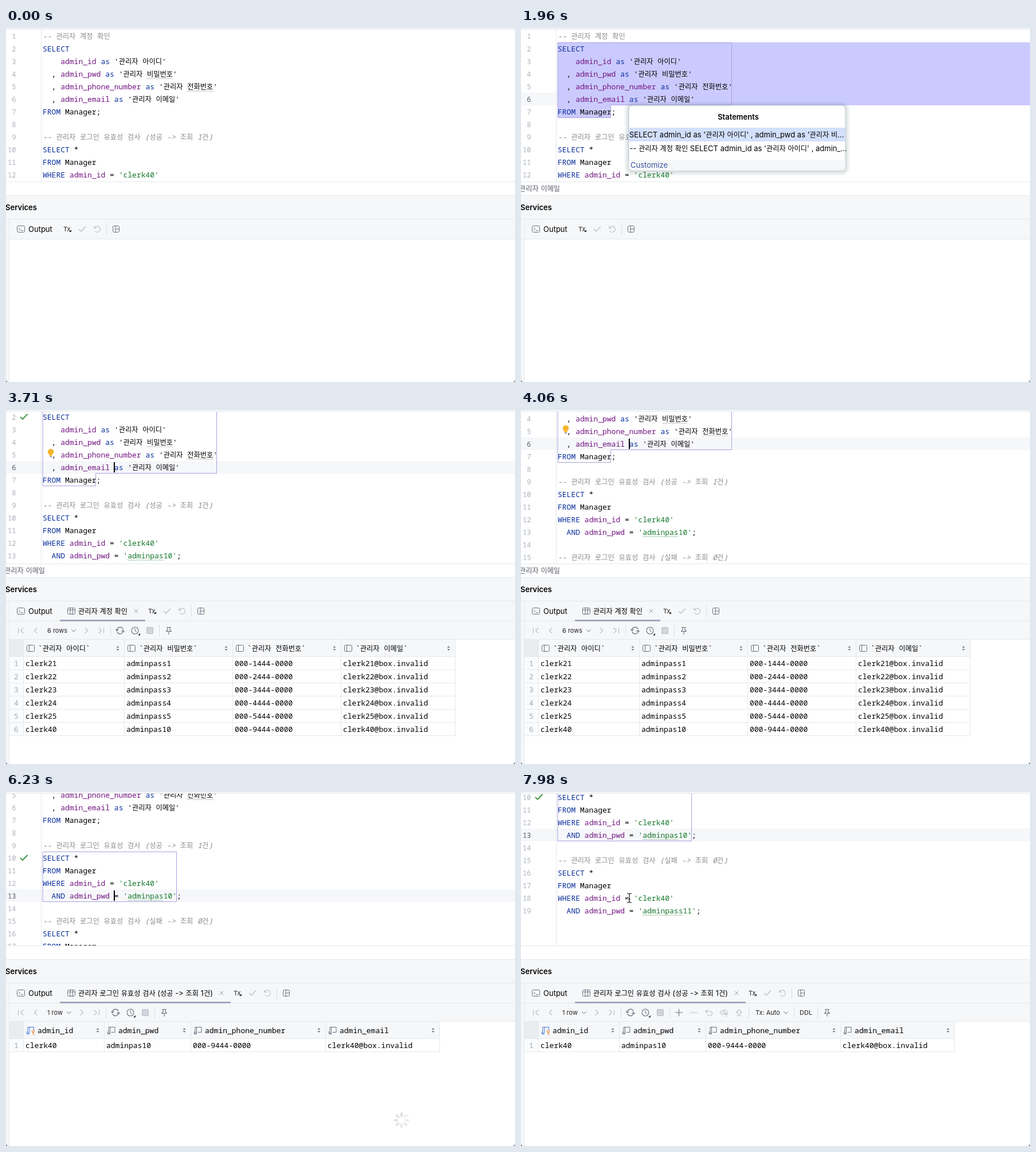
An HTML page that plays this animation: 888 by 618 pixels, repeating every 8 s.

```html
<!DOCTYPE html>
<html lang="ko">
<head>
<meta charset="utf-8">
<title>SQL console</title>
<style>
html, body { margin: 0; width: 100%; height: 100%; overflow: hidden; background: #fff; }
svg { display: block; width: 888px; height: 618px; }
text { white-space: pre; font: 13px Inter, sans-serif; }
.m { font: 13px "Noto Sans Mono", monospace; }
.n { font-size: 12px; text-anchor: end; fill: #adb1bd; }
.g { text-anchor: middle; fill: #a3a7b3; }
.u { font-size: 11px; fill: #222; }
.b { font-weight: 600; }
.k { font-family: "Noto Sans CJK KR", "Noto Sans CJK", sans-serif; font-size: 12.22px; font-style: normal; }
.w { fill: #0a2f9c; }
.f { fill: #731582; }
.s { fill: #14782b; }
.c { fill: #8c8c8c; font-style: italic; }
path { fill: none; stroke-linecap: round; stroke-linejoin: round; }
</style>
</head>
<body>
<svg id="stage" viewBox="0 0 888 618"></svg>
<script>
const LOOP = 8000, STEP = 70, ROW = 22;
const BG = '#f6f7f9', LINE = '#e6e8ec', INK = '#6c707e', DIM = '#b9bcc6';
const stage = document.getElementById('stage');

const code = `-- 관리자 계정 확인
SELECT
    admin_id as '관리자 아이디'
  , admin_pwd as '관리자 비밀번호'
  , admin_phone_number as '관리자 전화번호'
  , admin_email as '관리자 이메일'
FROM Manager;

-- 관리자 로그인 유효성 검사 (성공 -> 조회 1건)
SELECT *
FROM Manager
WHERE admin_id = 'clerk40'
  AND admin_pwd = 'adminpas10';

-- 관리자 로그인 유효성 검사 (실패 -> 조회 0건)
SELECT *
FROM Manager
WHERE admin_id = 'clerk40'
  AND admin_pwd = 'adminpass11';`.split('\n');
const typos = [[4, 246, 291], [5, 316, 362], [13, 212, 275], [19, 212, 283]];

const user = i => 'clerk' + (i < 6 ? 20 + i : 40);
const record = i => [user(i), i < 6 ? 'adminpass' + i : 'adminpas10',
  `000-${i < 6 ? i : 9}444-0000`, user(i) + '@box.invalid'];

const grids = [
  null,
  { title: '관리자 계정 확인', dx: 148, count: '6 rows', sx: 0, cols: [30, 206, 395, 584, 783], pad: 26,
    heads: ['아이디', '비밀번호', '전화번호', '이메일'].map(s => '`관리자 ' + s + '`'),
    rows: [1, 2, 3, 4, 5, 6].map(record) },
  { title: '관리자 로그인 유효성 검사 (성공 -> 조회 1건)', dx: 297, count: '1 row', sx: -8, cols: [30, 171, 322, 557, 756], pad: 25,
    heads: ['admin_id', 'admin_pwd', 'admin_phone_number', 'admin_email'],
    rows: [record(6)] }
];
const menus = [
  null,
  ["SELECT admin_id as '관리자 아이디' , admin_pwd as '관리자 비...",
   "-- 관리자 계정 확인 SELECT admin_id as '관리자 아이디' , admin_..."],
  ["SELECT * FROM Manager WHERE admin_id = 'clerk40' AND a...",
   '-- 관리자 로그인 유효성 검사 (성공 -> 조회 1건) SELECT * FRO...']
];

const runs = s => s.replace(/[가-힣]+/g, m => `<tspan class="k">${m}</tspan>`);
const text = (x, y, s, cls = '', fill = '') =>
  `<text x="${x}" y="${y}" class="${cls}"${fill && ` fill="${fill}"`}>${runs(s)}</text>`;
const rect = (x, y, w, h, fill, more = '') =>
  `<rect x="${x}" y="${y}" width="${w}" height="${h}" fill="${fill}" ${more}/>`;
const path = (d, color = INK, w = 1, more = '') =>
  `<path d="${d}" stroke="${color}" stroke-width="${w}" ${more}/>`;
const at = (x, y, s) => `<g transform="translate(${x} ${y})">${s}</g>`;
const hline = (y, x = 0, x2 = 888) => rect(x, y, x2 - x, 1, LINE);
const sep = (x, y) => rect(x, y - 10, 1, 20, '#dcdee4');
const clamp = v => Math.max(0, Math.min(1, v));
const rowTop = n => 3 + ROW * (n - 1);

const highlight = s => s.startsWith('--') ? `<tspan class="c">${s}</tspan>`
  : s.replace(/'[^']*'|\badmin_\w+|\b(SELECT|FROM|WHERE|AND|as)\b/g, m => {
      const cls = m[0] === "'" ? (/[가-힣]/.test(m) ? '' : 's') : m.startsWith('admin_') ? 'f' : 'w';
      return `<tspan class="${cls}">${m}</tspan>`;
    });

function wave(x, x2, y, color) {
  let d = `M${x} ${y}`;
  for (let i = 1; x + i * 2 <= x2; i++) d += `L${x + i * 2} ${y + (i % 2 ? 2 : 0)}`;
  return path(d, color, 0.9);
}

// Icons are centred on 0,0
const icon = {
  output: rect(-6.5, -5.5, 13, 11, 'none', `rx="2" stroke="${INK}"`) + path('M-3.5 -2L-1.5 0L-3.5 2M0 2.5H3.5'),
  table: rect(-6.5, -5.5, 13, 11, 'none', `rx="2" stroke="${INK}"`) + path('M-6 -2H6M-2 -5V5M2.5 -5V5'),
  layout: rect(-5.5, -5.5, 11, 11, 'none', `rx="2" stroke="${INK}"`) + path('M-1 -5V5M-1 0H5'),
  check: path('M-5.5 .5L-2 4L5.5 -4', DIM, 1.2),
  undo: path('M-5 -5V-1.5H-1.5M-4.5 -2A5.2 5.2 0 1 1 -4 3.5', DIM, 1.1),
  close: path('M-3 -3L3 3M3 -3L-3 3', '#9a9eaa'),
  first: path('M-4.5 -4.5V4.5M4 -4.5L-.5 0L4 4.5', DIM, 1.1),
  prev: path('M2 -4.5L-2.5 0L2 4.5', DIM, 1.1),
  next: path('M-2 -4.5L2.5 0L-2 4.5', DIM, 1.1),
  last: path('M4.5 -4.5V4.5M-4 -4.5L.5 0L-4 4.5', DIM, 1.1),
  down: path('M-3.5 -1.5L0 2L3.5 -1.5', INK),
  refresh: path('M-5.5 0A5.5 5.5 0 0 1 5 -2.5M5.5 0A5.5 5.5 0 0 1 -5 2.5M-7.5 -2L-5.5 .5L-3 -1.5M7.5 2L5.5 -.5L3 1.5', INK, 1.2),
  clock: `<circle r="6" fill="none" stroke="${INK}" stroke-width="1.1"/>` + path('M0 -3.5V.5L2.5 2') +
    '<path d="M9 4.5V8.5H5Z" style="fill:#333"/>',
  stop: rect(-5.5, -5.5, 11, 11, '#d3d5db', 'rx="1.5" stroke="#b9bcc6"'),
  pin: path('M-3.5 -5.5H3.5M-2 -5V-1L-4.5 1.5H4.5L2 -1V-5M0 2V6.5', INK, 1.1),
  plus: path('M-6 0H6M0 -6V6', INK, 1.1),
  minus: path('M-6 0H6', DIM, 1.1),
  back: path('M-3 -5L-6 -2L-3 1M-5.5 -2H2A3.5 3.5 0 0 1 2 5H-3', DIM, 1.1),
  eye: path('M-7 0Q0 -9 7 0M-7 0Q-4 4 -1 4', DIM, 1.1) + `<circle r="2" fill="none" stroke="${DIM}"/>` + path('M4 7V1M1.5 3.5L4 1L6.5 3.5', DIM, 1.1),
  up: path('M-5 0L0 -5L5 0H2V5.5H-2V0Z', DIM, 1.1),
  sort: '<path d="M-2.5 -1.2L0 -4L2.5 -1.2ZM-2.5 1.2L0 4L2.5 1.2Z" style="fill:#6c707e"/>',
  column: rect(-6.5, -5.5, 13, 11, 'none', `rx="2" stroke="${INK}"`) + path('M-2.5 -5V5'),
  field: path('M-2.5 5H-5V-5.5H6V3.5H0M-2.5 -5V5') + path('M-6.5 2.5V6.5H-2.5'),
  key: path('M-2.5 5H-5V-5.5H5.5V-1M-2 -5V4', '#4677d4') + path('M-6.5 2.5V6.5H-2.5', '#4677d4') +
    '<circle cx="4.5" cy="2" r="2" fill="none" stroke="#e08a3c" stroke-width="1.2"/>' + path('M4.5 4V7.5H6', '#e08a3c', 1.2),
  bulb: '<circle r="5.3" cy="-2" fill="#f5b62e"/>' + rect(-2.5, 3, 5, 2, '#f5b62e') + rect(-2, 5.6, 4, 1.6, '#8a8d98'),
  tick: path('M-5.5 .5L-2 4L6 -4.5', '#459b4c', 2)
};
const put = (name, x, y) => at(x, y, icon[name]);

function outline(block) {
  return block === 1 ? 'M64.5 25.5H367.5V134.5H156.5V156.5H64.5Z' : 'M64.5 201.5H297.5V288.5H64.5Z';
}

function editor(s) {
  let o = '';
  if (s.row) o += rect(0, rowTop(s.row), 888, ROW, '#f6f7fa');
  if (s.menu === 1) o += rect(64, 25, 824, 110, '#cbcafe') + rect(64, 135, 93, 22, '#cbcafe');
  if (s.menu === 2) o += rect(64, 201, 824, 66, '#cbcafe') + rect(64, 267, 234, 22, '#cbcafe');
  o += rect(61, 0, 1, 700, LINE);
  if (s.block) o += path(outline(s.block), '#a9a2df');
  code.forEach((line, i) => {
    const y = rowTop(i + 1) + 16;
    o += text(17.5, y - 0.5, '' + (i + 1), 'm n', '').replace('<text', i + 1 === s.row ? '<text style="fill:#555a68"' : '<text');
    o += `<text x="64" y="${y}" class="m">${runs(highlight(line))}</text>`;
  });
  if (!s.menu) for (const [n, a, b] of typos) o += wave(a, b, rowTop(n) + 18, n > 9 ? '#9cc5a0' : '#b4bcae');
  if (s.tick) o += put('tick', 31, rowTop(s.tick) + 11);
  if (s.bulb) o += put('bulb', 78, rowTop(5) + 8);
  if (s.caret) o += rect(188, rowTop(s.row) + 2, 2, 18, '#000');
  return `<clipPath id="pane"><rect y="3" width="888" height="265"/></clipPath>
    <g clip-path="url(#pane)">${at(0, -s.scroll, o)}</g>`;
}

function chrome(s) {
  const g = grids[s.grid], dx = g ? g.dx : 0;
  let o = rect(0, 0, 888, 2, BG) + hline(2) + hline(268);
  if (s.crumb) o += text(-3, 285, '관리자 이메일', '', '#5a5d68');
  o += rect(0, 292, 888, 77, BG) + hline(292) + hline(333) + hline(368);
  o += rect(0, 369, 5, 249, BG) + rect(5, 334, 1, 284, LINE);
  o += text(-1, 318, 'Services', 'b') + put('output', 26, 351) + text(39, 356, 'Output');
  if (g) {
    o += put('table', 114, 351) + text(126, 356, g.title) + put('close', 79 + dx, 351);
    o += rect(94, 366, dx + 1, 3, '#a3a6c0', 'rx="1"');
  }
  o += at(dx, 0, text(100, 355, 'Tx', 'u') + '<path d="M114 352V356H110Z" style="fill:#333"/>' +
    put('check', 133, 351) + put('undo', 159, 351) + sep(175, 351) + put('layout', 192, 351));
  return o + (g ? results(g, s.full) : '');
}

function results(g, full) {
  const Y = 385, right = g.cols[4], bottom = 430 + 23 * g.rows.length;
  let o = rect(6, 369, 882, 32, BG) + put('first', 26, Y) + put('prev', 52, Y) + text(72, 389, g.count, 'u');
  o += at(g.sx, 0, put('down', 118, Y) + put('next', 140, Y) + put('last', 166, Y) + sep(182, Y) +
    put('refresh', 199, Y) + put('clock', 225, Y) + put('stop', 251, Y) + sep(267, Y));
  if (full) {
    ['plus', 'minus', 'back', 'eye', 'up'].forEach((n, i) => o += put(n, 275.5 + i * 26.2, Y));
    o += sep(397, Y) + text(409, 389, 'Tx: Auto', 'u') + put('down', 462, Y) + sep(476, Y) +
      text(486, 389, 'DDL', 'u') + sep(517, Y) + put('pin', 534, Y);
  } else o += put('pin', 284 + g.sx, Y);
  o += rect(6, 401, right - 6, 29, BG) + rect(6, 401, 24, 29, '#ebecf0') + rect(6, 430, 24, bottom - 430, '#fafbfc');
  o += hline(400, 6);
  for (let y = 430; y <= bottom; y += 23) o += hline(y, 6, right + 1);
  g.cols.forEach(x => o += rect(x, 401, 1, bottom - 401, LINE));
  g.heads.forEach((h, i) => {
    const x = g.cols[i];
    o += put(g.sx ? (i ? 'field' : 'key') : 'column', x + 13, 416) + text(x + g.pad, 421, h, 'm');
    o += put('sort', g.cols[i + 1] - 11, 416);
  });
  g.rows.forEach((r, j) => {
    const y = 447 + 23 * j;
    o += text(18, y, '' + (j + 1), 'm g');
    r.forEach((v, i) => o += text(g.cols[i] + 4, y, v, 'm'));
  });
  return o;
}

function popup(s) {
  const [a, b] = menus[s.menu];
  let shadow = '';
  for (let i = 8; i > 0; i--) shadow += rect(-i, -i + 1, 378 + 2 * i, 114 + 2 * i, '#203040', `rx="${7 + i}" opacity=".018"`);
  return `<g opacity="${s.fade}">` + at(188, s.menu === 1 ? 135 : 192, shadow +
    rect(0, 0, 378, 114, '#fff', 'rx="7" stroke="#b9bcc6" stroke-width=".8"') +
    '<text x="191" y="25" class="b" text-anchor="middle">Statements</text>' +
    rect(0, 39, 378, 24, '#d3e0fc') + text(1, 56, a) + text(1.5, 80, b) +
    '<path d="M0 95H378V107A7 7 0 0 1 371 114H7A7 7 0 0 1 0 107Z" style="fill:#f6f7f9"/>' +
    text(3, 109, 'Customize', '', '#3b559c')) + '</g>';
}

function spinner(t) {
  let o = '';
  for (let i = 0; i < 8; i++) {
    const v = ((i - Math.round(t / STEP)) % 8 + 8) % 8;
    o += path('M0 -7.5V-12', '#8b8f98', 3.6, `opacity="${0.16 + v * 0.022}" transform="rotate(${i * 45})"`);
  }
  return at(690, 573, o);
}

function pointer([x, y]) {
  if (y > 268) return at(x, y, '<path d="M0 0V15L3.5 11.7L6 17L8.4 16L6 10.8H10.8Z" style="fill:#000" stroke="#fff"/>');
  const d = 'M-3.5 -8Q0 -8 0 -5.5Q0 -8 3.5 -8M0 -6V6M-3.5 8Q0 8 0 5.5Q0 8 3.5 8M-1.5 2H1.5';
  return at(x, y, path(d, '#fff', 3) + path(d, '#111', 1.2));
}

// Point on a polyline, p from 0 to 1
function along(pts, p) {
  const u = clamp(p) * (pts.length - 1), i = Math.min(pts.length - 2, Math.floor(u));
  return pts[i].map((v, k) => v + (pts[i + 1][k] - v) * (u - i));
}

function mouse(t) {
  if (t >= 350 && t < 1750) return along([[371, 472], [300, 250], [215, 68], [189, 124]], (t - 350) / 630);
  if (t >= 4480 && t < 5390) return along([[189, 136], [189, 180]], (t - 4480) / 210);
  if (t >= 7840) return along([[186, 179], [189, 185]], (t - 7840) / 140);
  return null;
}

function state(t) {
  const within = (a, b) => t >= a && t < b;
  const menu = within(1890, 2660) ? 1 : within(5530, 5880) ? 2 : 0;
  return {
    scroll: Math.round(97 * clamp((t - 3500) / 840) + 106 * clamp((t - 6650) / 910)),
    row: t < 980 ? 0 : t < 4900 ? 6 : 13,
    block: t < 1400 ? 0 : t < 4900 ? 1 : 2,
    menu,
    fade: t === 1890 || t === 5530 ? 0.5 : 1,
    tick: within(2730, 5040) ? 2 : t >= 5950 ? 10 : 0,
    bulb: within(3570, 4900),
    crumb: within(980, 5040),
    caret: !menu && t >= 980 && !within(3220, 3570) && t < 7840,
    grid: t < 2730 ? 0 : t < 5950 ? 1 : 2,
    full: t >= 6580,
    spin: within(2870, 3290) || within(6020, 6370),
    mouse: mouse(t)
  };
}

function draw(t) {
  const s = state(t);
  stage.innerHTML = rect(0, 0, 888, 618, '#fff') + editor(s) + chrome(s) +
    (s.menu ? popup(s) : '') + (s.spin ? spinner(t) : '') + (s.mouse ? pointer(s.mouse) : '') +
    '<path d="M0 615V618H3ZM888 615V618H885Z" style="fill:#777"/>';
}

let shown = -1;
const start = performance.now();
function tick() {
  const t = Math.floor((performance.now() - start) % LOOP / STEP) * STEP;
  if (t !== shown) draw(shown = t);
  requestAnimationFrame(tick);
}
tick();
</script>
</body>
</html>
```
